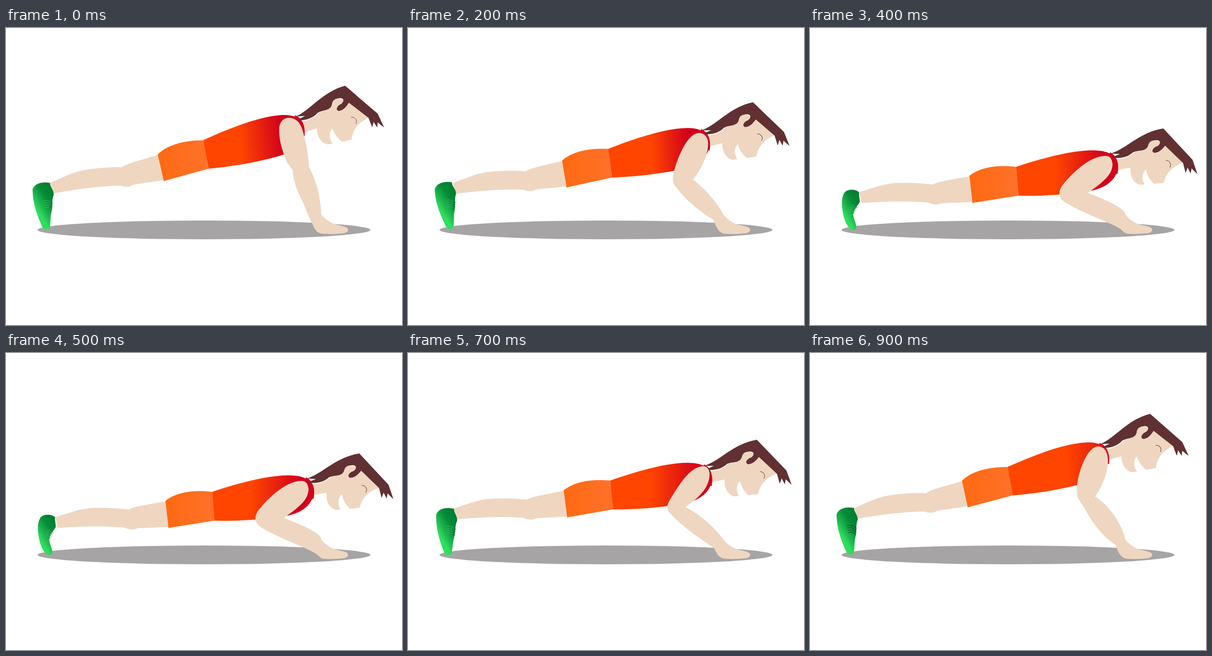
Animation of 864x648 px, one loop 1000 ms. Source, as an HTML page:

```html
<!DOCTYPE html>
<html lang="en">
<head>
<meta charset="utf-8">
<title>Push-up</title>
<style>
html, body { margin: 0; width: 100%; height: 100%; overflow: hidden; background: #fff; }
svg { display: block; width: 864px; height: 648px; }
</style>
</head>
<body>
<svg viewBox="0 0 864 648">
  <defs>
    <linearGradient id="shirt" gradientUnits="userSpaceOnUse" y1="245" y2="235">
      <stop stop-color="#ff4500"/><stop offset="1" stop-color="#d2001c"/>
    </linearGradient>
    <linearGradient id="shorts">
      <stop stop-color="#ff6912"/><stop offset="1" stop-color="#ff722b"/>
    </linearGradient>
    <linearGradient id="green" gradientUnits="userSpaceOnUse" x1="100" y1="360" x2="60" y2="385">
      <stop stop-color="#017f33"/><stop offset=".35" stop-color="#078c39"/><stop offset=".7" stop-color="#1cb54d"/><stop offset="1" stop-color="#30de5e"/>
    </linearGradient>
  </defs>
  <ellipse cx="432" cy="440.5" rx="363" ry="20.5" fill="#a6a4a5"/>
  <g id="body">
    <g fill="#efd6c1">
      <path d="M96,338C120,328 140,317 165,311C195,305 235,303 253,304C263,296 285,291 331,277L343,332L277,342C270,348 258,347 250,344C210,344 150,352 104,361Z"/>
      <path d="M646,204C662,201 676,194 683,184L706,176L712,150L750,160L791,195C775,204 757,216 754,244L733,248C721,239 716,230 712,219C705,226 704,242 713,252L702,254C686,250 679,236 678,219L652,227Z"/>
    </g>
    <path fill="url(#shorts)" d="M331,276C355,252 395,245 430,245L442,307L344,334Z"/>
    <path fill="url(#shirt)" d="M430,245C480,222 550,193 600,190C638,187 652,206 651,225C649,247 633,268 597,279C555,291 500,302 442,307Z"/>
    <path fill="none" stroke="#d2001c" stroke-width="3" d="M630,192C645,197 652,214 650,236"/>
    <path fill="#613032" d="M632,193C664,180 690,139 740,126L811,187L825,217L811,206L810,217L802,205L799,217L791,196L748,163C742,173 735,180 726,181C717,179 724,168 731,166C740,159 736,152 728,153C717,154 712,158 711,167C708,181 692,178 680,185C670,197 652,203 635,201L652,192Z"/>
    <path fill="none" stroke="#5b3a38" d="M753,195C760,193 768,201 763,209"/>
  </g>
  <g id="shoe">
    <path id="sole" fill="url(#green)"/>
    <path id="laces" fill="none"/>
    <path id="ticks" fill="none" stroke="#15482a"/>
  </g>
  <path id="arm" fill="#efd6c1"/>
</svg>
<script>
const $ = id => document.getElementById(id);
const set = (id, attrs) => { for (const k in attrs) $(id).setAttribute(k, attrs[k]); };

// Body: crown position and turn; grad: shirt shading span; arm: outer edge, then inner edge
const high = {
  x: 740, y: 126, turn: 0, grad: [510, 602],
  outer: "M617,196C606,196 596,204 596,222C596,250 604,268 609,284C614,297 620,302 625,309C627,330 633,352 644,372C655,395 660,412 668,426C674,442 680,448 692,449",
  inner: "C686,380 683,345 661,303C660,285 657,260 651,238C646,214 638,196 617,196Z"
};
const bent = {
  x: 742, y: 132.7, turn: .56, grad: [560, 690],
  outer: "M628,204C608,206 595,238 587,265C582,285 579,310 588,322C600,338 612,365 628,383C640,399 655,411 666,418C672,432 676,447 692,449",
  inner: "C680,372 655,335 622,313C640,290 650,255 650,240C651,215 642,204 628,204Z"
};
const half = {
  x: 752.7, y: 162, turn: 3.15, grad: [525, 605],
  outer: "M635,229C612,230 594,270 584,300C577,322 575,337 585,347C602,372 638,402 666,418C672,432 676,447 692,449",
  inner: "C677,385 650,352 622,331C640,308 653,280 655,255C655,238 647,229 635,229Z"
};
const low = {
  x: 761, y: 189.2, turn: 5.43, grad: [518, 625],
  outer: "M643,247C614,249 590,290 571,321C564,333 564,341 572,350C600,380 640,407 668,426C674,440 680,448 692,449",
  inner: "C673,385 638,352 605,336C640,313 658,290 658,264C657,251 651,247 643,247Z"
};
const floor = {
  x: 771, y: 219.2, turn: 6.4, grad: [515, 622],
  outer: "M645,279C610,278 566,322 548,347C542,358 543,370 553,378C590,402 645,420 675,437C683,442 685,449 696,449",
  inner: "C690,395 645,374 606,360C640,336 660,320 660,297C659,284 653,279 645,279Z"
};
const hand = "C708,450 725,449 735,448C744,447 748,443 746,438C742,432 725,431 714,427C704,422 694,415 688,407";

const straight = {
  sole: "M58,352C63,338 80,335 96,338C96,347 105,354 104,364C99,376 103,390 99,402C96,415 98,437 93,439C88,441 82,440 79,434C72,416 58,388 58,352Z",
  laces: [0, 1, 2, 3].map(i => `M${80 + i},${377 + 5 * i}Q${93 - i},${374 + 5 * i} ${102 - i},${383 + 4 * i}`).join(""),
  ticks: [0, 1, 2, 3].map(i => `M${98 - i},${379 + 4.5 * i}l4,4`).join("")
};
const curled = {
  sole: "M76,358C84,351 98,351 107,358C106,366 110,376 108,381C103,388 97,395 95,402C92,412 101,425 101,433C101,439 97,442 92,441C82,436 74,420 71,398C68,380 70,366 76,358Z",
  laces: [0, 1, 2, 3].map(i => `M${88 - i},${388 + 4 * i}q7,-3 11,3`).join(""),
  ticks: [0, 1, 2, 3].map(i => `M${100 - 2 * i},${389 + 4 * i}l3,4`).join("")
};
const pale = "#3fb768", dark = "#123a20";

// Each step: body pose, shoe, shoe shift, shoe turn, lace colour
const steps = [
  [high, straight, 0, 0, pale],
  [bent, straight, 0, 0, pale],
  [half, straight, 0, -2.4, pale],
  [low, straight, 4, -1.2, pale],
  [floor, curled, 0, 0, pale],
  [floor, curled, 0, 0, pale],
  [floor, curled, 2, 0, pale],
  [low, straight, 4, 2.8, pale],
  [half, straight, 0, -2.4, pale],
  [bent, straight, 0, 0, dark]
];

let shown = -1;
function draw() {
  const n = Math.floor(performance.now() / 100) % steps.length;
  if (n !== shown) {
    shown = n;
    const [pose, shoe, shift, tilt, lace] = steps[n];
    set("body", { transform: `translate(${pose.x - 740} ${pose.y - 126}) rotate(${pose.turn} 740 126)` });
    set("shirt", { x1: pose.grad[0], x2: pose.grad[1] });
    set("shoe", { transform: `translate(${shift} 0) rotate(${tilt} 58 345)` });
    set("sole", { d: shoe.sole });
    set("laces", { d: shoe.laces, stroke: lace });
    set("ticks", { d: shoe.ticks });
    set("arm", { d: pose.outer + hand + pose.inner });
  }
  requestAnimationFrame(draw);
}
draw();
</script>
</body>
</html>
```
